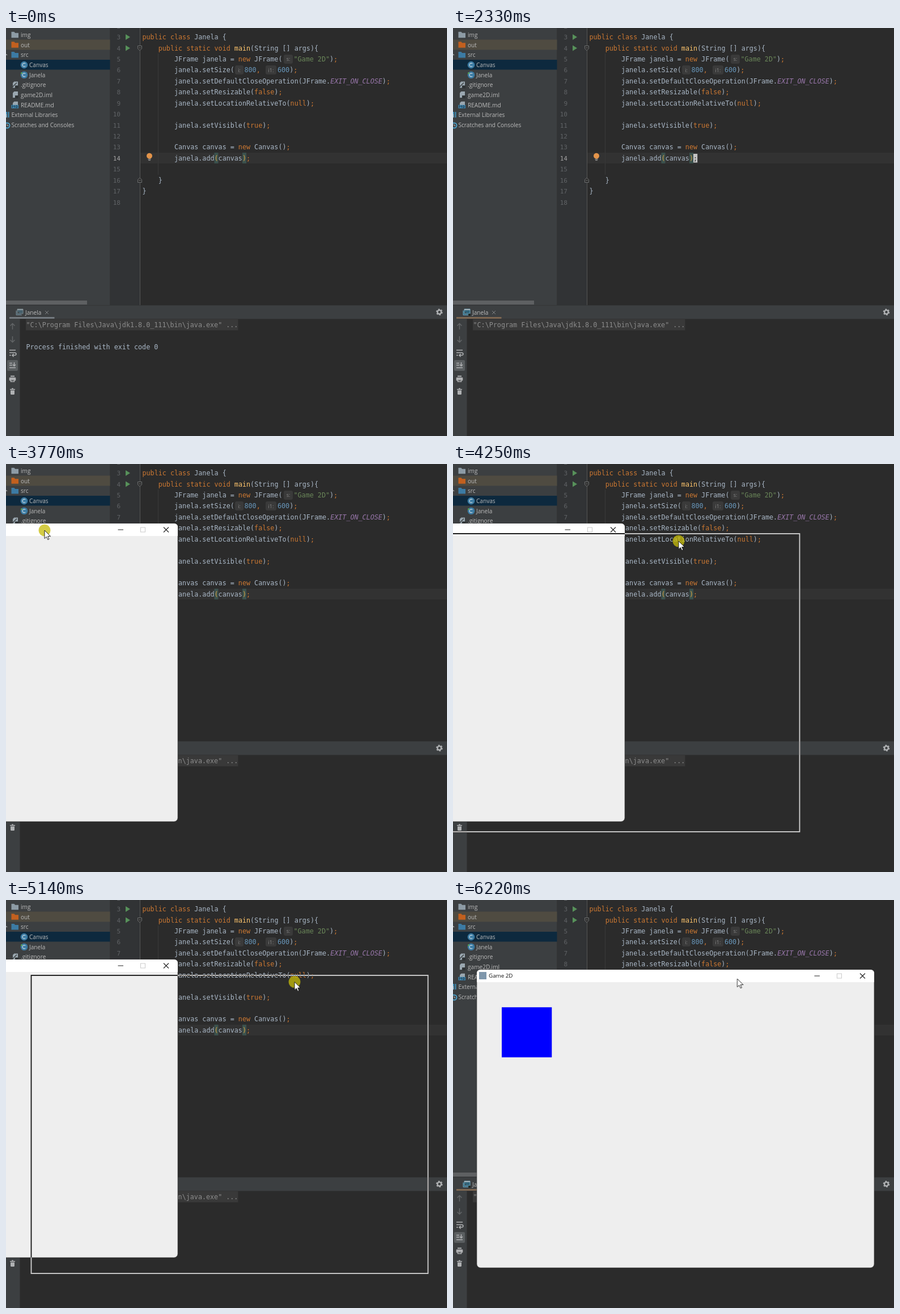
Write an HTML page that moves like this. It is 778 px wide and 720 px high and loops after 8000 ms.

```html
<!DOCTYPE html>
<html lang="pt">
<head>
<meta charset="utf-8">
<title>Janela</title>
<style>
html, body { margin: 0; height: 100%; overflow: hidden; background: #2b2b2b; }
svg { display: block; width: 100vw; height: 100vh; }
text { white-space: pre; font: 10.1px "Open Sans", "Noto Sans", sans-serif; fill: #bbb; }
.mono text { font: 11.73px "DejaVu Sans Mono", "Noto Sans Mono", monospace; fill: #a9b7c6; }
.mono .num { font-size: 11px; fill: #606366; text-anchor: end; }
.mono .current { fill: #a4a3a3; }
.mono .hint { font: 9px "Open Sans", sans-serif; fill: #868686; text-anchor: middle; }
.mono .dim { fill: #8c8c8c; }
.key { fill: #cc7832; }
.str { fill: #6a8759; }
.val { fill: #6897bb; }
.fn { fill: #ffc66d; }
.const { fill: #9876aa; font-style: italic; }
.match { fill: #d9a343; }
.icon { fill: none; stroke: #afb1b3; stroke-width: 1.5; }
.off { stroke: #626567; }

.anim { animation: 8s step-end -10ms infinite; }
.caret { animation-name: caret; }
.idle { animation-name: idle; }
.running { animation-name: running; }
.command { animation-name: command; }
.trash { animation-name: trash; }
.window { animation-name: window; }
.beam { animation-name: beam, beam-show; }
.outline { animation-name: outline, outline-show; mix-blend-mode: difference; }
.pointer { animation-name: pointer, pointer-show; }
.halo { animation-name: press; }

@keyframes caret { 0%, 35.25% { visibility: hidden } 19.875% { visibility: visible } }
@keyframes idle { 0% { visibility: visible } 26.625%, 100% { visibility: hidden } }
@keyframes running { 0% { visibility: hidden } 26.625%, 100% { visibility: visible } }
@keyframes command { 0%, 29.125%, 100% { visibility: visible } 26.625% { visibility: hidden } }
@keyframes trash { 0%, 29.125%, 100% { opacity: 1 } 26.625% { opacity: .4 } }
@keyframes window {
  0% { transform: translate(-398px, 105px); visibility: hidden }
  34.375% { transform: translate(-398px, 105px); visibility: visible }
  65.875% { transform: translate(44px, 133px); visibility: visible }
  77.75%, 100% { transform: translate(42px, 123px); visibility: visible }
}
@keyframes beam {
  0%, 3.125% { transform: translate(748px, 640px); animation-timing-function: steps(6) }
  8.5%, 100% { transform: translate(540px, -126px) }
}
@keyframes beam-show { 0%, 8.5%, 100% { visibility: hidden } 3.125% { visibility: visible } }
@keyframes pointer {
  0%, 39.375% { transform: translate(300px, 32px); animation-timing-function: steps(6) }
  44.625% { transform: translate(68px, 117px) }
  47.125% { transform: translate(68px, 117px); animation-timing-function: steps(7) }
  53.125% { transform: translate(398px, 136px); animation-timing-function: steps(4) }
  56.75% { transform: translate(450px, 138px) }
  57.5% { transform: translate(452px, 139px); animation-timing-function: steps(8) }
  64.25% { transform: translate(509px, 144.5px) }
  65.875% { transform: translate(508.5px, 144.5px) }
  68.375% { transform: translate(507px, 146px); animation-timing-function: steps(2) }
  70.125% { transform: translate(503.5px, 149.5px) }
  72.625% { transform: translate(503.5px, 149.5px); animation-timing-function: steps(5) }
  77.75%, 100% { transform: translate(501.5px, 139px) }
}
@keyframes pointer-show { 0% { visibility: hidden } 39.375%, 100% { visibility: visible } }
@keyframes press {
  0%, 65.875%, 77.75%, 100% { visibility: hidden }
  47.125%, 72.625% { visibility: visible }
}
@keyframes outline {
  0%, 47.125% { transform: translate(-398px, 105px); animation-timing-function: steps(7) }
  53.125% { transform: translate(-89px, 123px); animation-timing-function: steps(4) }
  56.75% { transform: translate(-16px, 126px) }
  57.5% { transform: translate(-14px, 127px); animation-timing-function: steps(8) }
  64.25% { transform: translate(44px, 133px) }
  72.625% { transform: translate(44px, 133px); animation-timing-function: steps(5) }
  77.75%, 100% { transform: translate(42px, 123px) }
}
@keyframes outline-show {
  0%, 65.875%, 77.75%, 100% { visibility: hidden }
  48%, 73.5% { visibility: visible }
}
</style>
</head>
<body>
<svg viewBox="0 0 778 720">
  <rect width="778" height="720" fill="#2b2b2b"/>

  <!-- project tree -->
  <rect width="183.5" height="489" fill="#3c3f41"/>
  <rect y="20.5" width="183.5" height="18" fill="#4f4b41"/>
  <rect y="56" width="183.5" height="17.5" fill="#0d293e"/>
  <rect y="481" width="143" height="7" fill="#5e6062"/>
  <g id="tree"></g>
  <path d="M0 45.500l3 2.500h-3" fill="#9a9da0"/>
  <path d="M27 78l6 3.500-6 3.500z" fill="#62b543" transform="translate(13 39) scale(.5)"/>
  <path d="M1 148v10M4.500 148v10" stroke="#3e8fb8" stroke-width="2"/>
  <path d="M.5 152v6" stroke="#9aa7b0" stroke-width="1.500"/>
  <circle cx="2" cy="172" r="4.500" fill="#3c3f41" stroke="#4a9cc4" stroke-width="2"/>
  <path d="M2 169.500v3h2.500" class="icon" style="stroke-width:1"/>

  <!-- editor -->
  <rect x="184" width="52" height="489" fill="#313335"/>
  <rect x="237" y="220" width="541" height="19" fill="#323232"/>
  <path d="M236.500 0v489" stroke="#555"/>
  <path d="M268.500 45v214" stroke="#393939"/>
  <path d="M211 11l8 5-8 5zM211 30.500l8 5-8 5z" fill="#57915a"/>
  <g fill="#2b2b2b" stroke="#747678" stroke-width=".9">
    <path d="M232.500 31.500h7v5l-3.500 3-3.500-3zM234 35h4"/>
    <path d="M232.500 272.500h7v-5l-3.500-3-3.500 3zM234 269h4"/>
  </g>
  <circle cx="253" cy="225.800" r="5" fill="#e3944a"/>
  <path d="M250.500 231.500h5M251 233.500h4" stroke="#a5a7a8" stroke-width="1.200"/>
  <path d="M367.500 220h7v19h-7zM417 220h7v19h-7z" fill="#3b514d"/>
  <g fill="#3a3a3a">
    <rect x="490" y="47" width="16" height="16" rx="3"/>
    <rect x="404" y="66" width="15" height="16" rx="3"/>
    <rect x="458" y="66" width="19" height="16" rx="3"/>
  </g>
  <g class="mono" id="code">
    <text class="hint" x="498" y="58">s:</text>
    <text class="hint" x="411.500" y="77.500">i:</text>
    <text class="hint" x="467.500" y="77.500">i1:</text>
  </g>
  <g class="mono anim caret">
    <rect x="424" y="222" width="7.200" height="15.500" fill="#c3c3c3"/>
    <text x="424" y="233.800" style="fill:#2b2b2b">;</text>
  </g>

  <!-- run panel -->
  <rect y="489" width="778" height="24.500" fill="#3c3f41"/>
  <path d="M0 489.500h778" stroke="#343637"/>
  <rect y="513" width="24.500" height="207" fill="#3c3f41"/>
  <g class="anim idle">
    <path d="M20 496h10v8h-10zM18 498.500v8h10" fill="#46606c" stroke="#77848b"/>
    <path d="M20 497h10" stroke="#8a969c" stroke-width="2"/>
    <rect x="6" y="510" width="79.500" height="3" fill="#747a80"/>
  </g>
  <g class="anim running">
    <path d="M20 496h10v8h-10zM18 498.500v8h10" fill="#31647a" stroke="#6aa5bd"/>
    <path d="M20 497h10" stroke="#a2b0b8" stroke-width="2"/>
    <circle cx="29" cy="506" r="2" fill="#20251f"/>
    <rect x="6" y="510" width="79.500" height="3" fill="#7d6752"/>
  </g>
  <text x="34" y="505.500">Janela</text>
  <path d="M69 499l6 6m0-6l-6 6" class="icon" style="stroke:#7d8082;stroke-width:1"/>
  <circle cx="764.500" cy="501.300" r="3.400" class="icon" style="stroke-width:2.400"/>
  <circle cx="764.500" cy="501.300" r="5" class="icon" stroke-dasharray="2.600 2.636" style="stroke-width:1.800"/>

  <g class="icon">
    <path class="off" d="M11.500 532v-10M7.500 525.500l4-4 4 4M11.500 544v10M7.500 550.500l4 4 4-4"/>
    <path d="M6 568.500h11M6 573h9q3 0 3 2.300t-3 2.300h-3.500M13.500 575l-2.500 2.600 2.500 2.600M6 577.500h3"/>
    <rect x="2" y="586" width="19" height="19" rx="2" fill="#5a5e60" stroke="none"/>
    <path d="M6 591.500h5M6 595h5M6 599.500h11M14.500 590v6M12 594l2.500 2.500 2.500-2.500"/>
    <path d="M8 614.500h7" stroke-width="2"/>
    <path d="M6 617h11v5h-2v-2h-7v2h-2z" fill="#afb1b3" stroke-width=".6"/>
    <path d="M8.500 621h6v3h-6z"/>
  </g>
  <path class="anim trash" d="M7 637h3l.5-1.500h2l.5 1.500h3v1.500h-9zM8 639.500h7v6q0 1.500-1.500 1.500h-4q-1.500 0-1.500-1.500z" fill="#afb1b3"/>

  <g class="mono">
    <g class="anim command">
      <rect x="35" y="514" width="374.500" height="19.500" fill="#393939"/>
      <text class="dim" x="35.500" y="527.800">"C:\Program Files\Java\jdk1.8.0_111\bin\java.exe" ...</text>
    </g>
    <text class="anim idle" x="35.500" y="566.500">Process finished with exit code 0</text>
  </g>

  <!-- game window -->
  <g class="anim window">
    <rect width="701" height="526" rx="6.500" fill="#eee" stroke="#444" stroke-width=".6"/>
    <path d="M0 22v-15.500q0-6.500 6.500-6.500h688q6.500 0 6.500 6.500v15.500z" fill="#fff"/>
    <rect x="4" y="4" width="13" height="13" fill="#7f97ac"/>
    <text x="21" y="14.200" style="font-size:9.8px;fill:#111">Game 2D</text>
    <g fill="none" stroke="#222" stroke-width="1.100">
      <path d="M595.500 11h9.500M676 6.500l9 9m0-9l-9 9"/>
      <path d="M635.500 7h8v8h-8z" stroke="#ccc"/>
    </g>
    <rect x="44" y="66.300" width="88.300" height="88.300" fill="#00f"/>
  </g>

  <rect class="anim outline" x=".5" y="0" width="700" height="526" fill="none" stroke="#fff" stroke-width="1.800"/>
  <path class="anim beam" d="M1 .5h2.500l1.500 1 1.500-1h2.500M5 1.500v14M1 16.500h2.500l1.500-1 1.500 1h2.500" fill="none" stroke="#ddd"/>
  <g class="anim pointer">
    <circle class="anim halo" r="10.500" fill="#c6bc0a" fill-opacity=".76"/>
    <path d="M0 0v14.500l3.400-3.100 2.400 5.200 2.200-1-2.300-5h4.800z" fill="#fff" stroke="#111" stroke-width=".9"/>
  </g>
</svg>
<script>
const byId = id => document.getElementById(id);
const CHAR = 7.06;
const baseline = line => 20.2 + 19.42 * (line - 3);

const tokens = new RegExp([
  '(?<str>".*?")',
  '(?<key>\\b(?:public|class|static|void|new|true|false|null)\\b|[;,])',
  '(?<val>\\b\\d+\\b)',
  '(?<fn>\\bmain\\b)',
  '(?<const>EXIT_ON_CLOSE)',
  '(?<match>(?<=add)\\(|(?<=canvas)\\))'
].join('|'), 'g');

const highlight = source => source.replace(tokens, (word, ...rest) => {
  const groups = rest.at(-1);
  const kind = Object.keys(groups).find(name => groups[name]);
  return `<tspan class="${kind}">${word}</tspan>`;
});

// Each entry: line number, indent in characters, source, optional x after an inlay hint.
const code = [
  [3, 0, 'public class Janela {'],
  [4, 4, 'public static void main(String [] args){'],
  [5, 8, 'JFrame janela = new JFrame('],
  [5, 0, '"Game 2D");', 507.5],
  [6, 8, 'janela.setSize('],
  [6, 0, '800,', 420.5],
  [6, 0, '600);', 479],
  [7, 8, 'janela.setDefaultCloseOperation(JFrame.EXIT_ON_CLOSE);'],
  [8, 8, 'janela.setResizable(false);'],
  [9, 8, 'janela.setLocationRelativeTo(null);'],
  [11, 8, 'janela.setVisible(true);'],
  [13, 8, 'Canvas canvas = new Canvas();'],
  [14, 8, 'janela.add(canvas);'],
  [16, 4, '}'],
  [17, 0, '}']
];

let editor = '';
for (let line = 2; line <= 18; line++)
  editor += `<text class="num${line === 14 ? ' current' : ''}" x="202" y="${baseline(line)}">${line}</text>`;
for (const [line, indent, source, x = 240.5 + indent * CHAR] of code)
  editor += `<text x="${x}" y="${baseline(line)}">${highlight(source)}</text>`;
byId('code').insertAdjacentHTML('beforeend', editor);

const folder = color => y =>
  `<path d="M9.500 ${y - 5.5}h5l1.500 2h6v8.500h-12.500z" fill="${color}"/>`;
const classIcon = y =>
  `<circle cx="32" cy="${y}" r="6.300" fill="#3b7ba3"/>
   <path d="M34.300 ${y - 2}a3 3 0 1 0 0 4" fill="none" stroke="#c4d5df" stroke-width="1.200"/>`;
const file = y =>
  `<path d="M14.500 ${y - 6}h6.500v11h-9v-8.500z" fill="#9aa7b0"/>
   <path d="M16 ${y + 1}h6v5h-6z" fill="#2f3335"/>`;
const ignored = y => file(y) + `<path d="M11 ${y + 4}l8-8" stroke="#3c3f41" stroke-width="1.500"/>`;
const markdown = y => file(y) +
  `<rect x="9.500" y="${y}" width="12.500" height="6" fill="#3f86b0"/>
   <path d="M11.500 ${y + 5}v-4l2 2 2-2v4M18 ${y + 1}v4q2.500 0 2.500-2t-2.500-2" fill="none" stroke="#1f3442" stroke-width=".9"/>`;
const none = () => '';

const rows = [
  ['img', 26, folder('#8d9ba5')],
  ['out', 26, folder('#c2601f')],
  ['src', 26, folder('#3c7ba4')],
  ['Canvas', 41, classIcon],
  ['Janela', 41, classIcon],
  ['.gitignore', 26, ignored],
  ['game2D.iml', 26, file],
  ['README.md', 26, markdown],
  ['External Libraries', 9.5, none],
  ['Scratches and Consoles', 9.5, none]
];
byId('tree').innerHTML = rows.map(([label, x, icon], i) => {
  const y = 12.2 + 17.65 * i;
  return `${icon(y)}<text x="${x}" y="${y + 3.8}">${label}</text>`;
}).join('');
</script>
</body>
</html>
```
